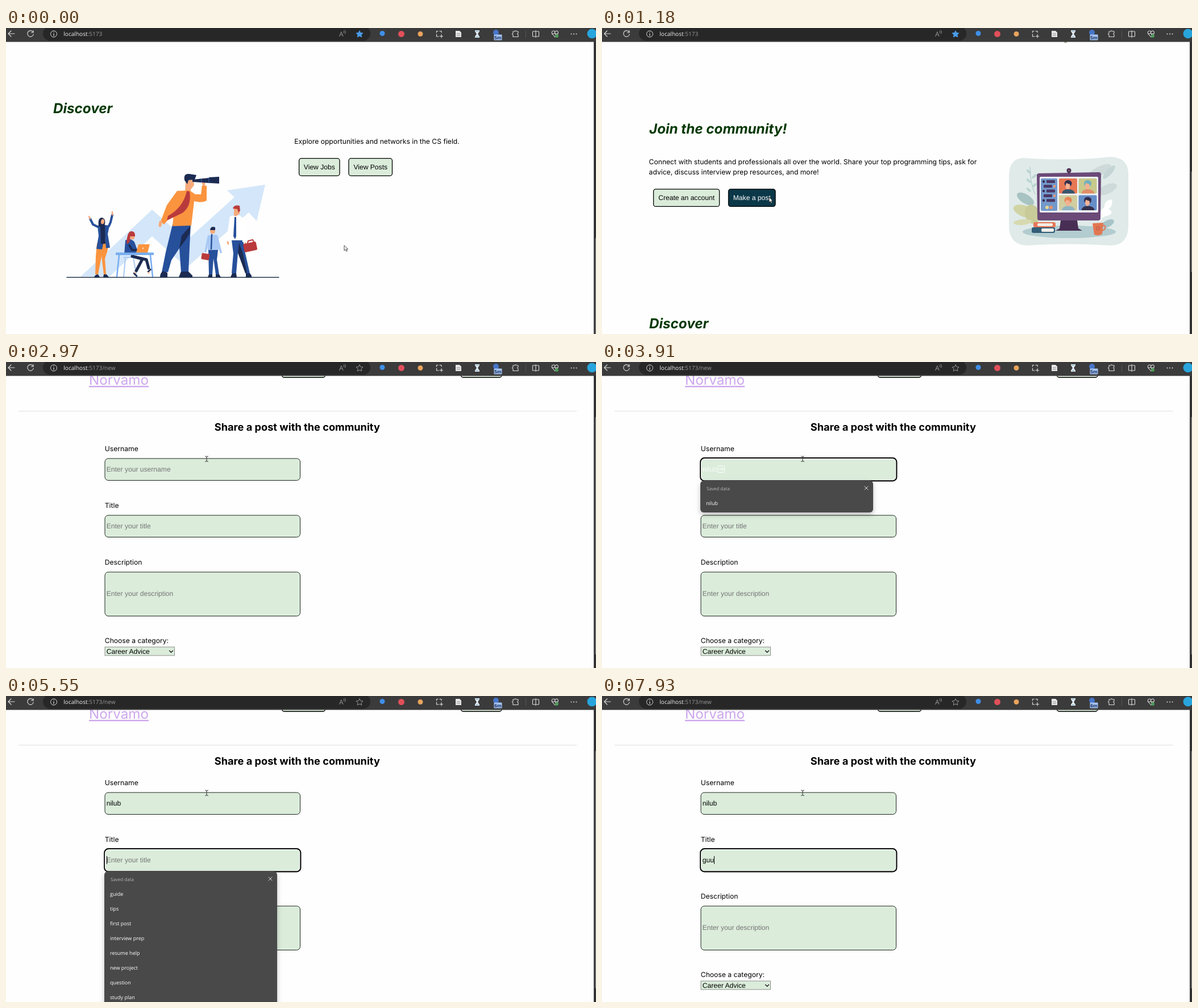
Animation of 1038 by 539 pixels, one loop 8000 ms. Source, as an HTML page:

```html
<!DOCTYPE html>
<html lang="en">
<head>
<meta charset="utf-8">
<title>Community post form</title>
<style>
  html, body { margin: 0; width: 100%; height: 100%; overflow: hidden; background: #fdfefd; }
  svg { display: block; width: 1038px; height: 539px; }
  text { white-space: pre; text-rendering: geometricPrecision; }
  .inter { font-family: Inter, sans-serif; font-size: 12.13px; }
  .arial { font-family: "Liberation Sans", Arial, sans-serif; font-size: 12.1px; }
  .ui { font-family: "Open Sans", "Noto Sans", sans-serif; font-size: 10.1px; }
  .head { font-size: 24.2px; font-weight: 700; font-style: italic; fill: #043804; }
  .mid { text-anchor: middle; }
</style>
</head>
<body>
<svg id="stage" viewBox="0 0 1038 539" xmlns="http://www.w3.org/2000/svg"></svg>
<script>
const LOOP = 8000;
const GREEN = '#dbecdb', NAVY = '#1c2b52', BLUE = '#27509b', ORANGE = '#fb943f', SKIN = '#f6aa7c', RED = '#b93a3c';
const USER = 'nilub';

const rect = (x, y, w, h, fill, rx = 0, extra = '') =>
  `<rect x="${x}" y="${y}" width="${w}" height="${h}" rx="${rx}" fill="${fill}" ${extra}/>`;
const circle = (x, y, r, fill) => `<circle cx="${x}" cy="${y}" r="${r}" fill="${fill}"/>`;
const oval = (x, y, rx, ry, fill, turn = 0) =>
  `<ellipse rx="${rx}" ry="${ry}" fill="${fill}" transform="translate(${x} ${y}) rotate(${turn})"/>`;
const shape = (d, fill) => `<path d="${d}" fill="${fill}"/>`;
const line = (d, stroke, width = 1) =>
  `<path d="${d}" fill="none" stroke="${stroke}" stroke-width="${width}" stroke-linecap="round" stroke-linejoin="round"/>`;
const text = (x, y, str, cls, extra = '') => `<text x="${x}" y="${y}" class="${cls}" ${extra}>${str}</text>`;
const button = (x, y, w, label, id = '') =>
  `<g id="${id}" fill="#000">${rect(x, y, w, 30.6, GREEN, 4, 'stroke="#000" stroke-width="1.3"')}` +
  `${text(x + w / 2, y + 19.4, label, 'arial mid')}</g>`;

function team() {
  const telescope = shape('M328 267L357 264V263L375 262V274L357 273L328 271Z', NAVY) +
    line('M344 266V272M357 264V273', '#3f69b5');
  return shape('M131 438L257 320L318 374L402 298L389 286L456 276L441 340L427 325L318 422L257 367L182 438Z', '#d4e6f9') +
    // cheering woman
    line('M161 350L153 346L148 336M181 349L184 342L187 329', BLUE, 4) +
    line('M148 336L146 332M187 329L187 324', SKIN, 2.5) +
    shape('M160 379H178L179 391L174 406L176 434H172L168 402L162 434H157L158 402Z', ORANGE) +
    shape('M161 348L166 347L174 347L182 348L179 363L183 387L176 388L174 366L169 390L159 389L163 366Z', BLUE) +
    shape('M166 347H174L175 380H167Z', NAVY) +
    shape('M163 349Q161 334 169 334Q177 336 173 349L169 352Z', NAVY) + oval(170, 341, 3, 4.5, SKIN, 10) +
    shape('M155 439Q157 434 162 434L165 439ZM171 439L172 434H177L181 439Z', NAVY) +
    // desk worker
    line('M210 404L207 439M224 404L230 439M207 404H229', '#a9c9f2', 2) +
    shape('M210 374Q219 369 226 377L231 391L228 399H208Z', BLUE) +
    line('M222 402L240 407L229 428M226 403L247 408L251 423', NAVY, 5) +
    line('M228 430L226 435M253 426L251 432', SKIN, 2) + line('M225 432L230 437M250 429L255 425', NAVY, 2.5) +
    circle(222, 368, 4.5, SKIN) + shape('M212 380Q213 359 220 358Q228 358 227 367L218 367Q220 379 212 380Z', RED) +
    line('M217 383L222 391H232', NAVY, 3.5) + shape('M233 381H253L249 396H229Z', ORANGE) + circle(241, 388, 1, '#fff') +
    rect(193, 395.5, 67, 4.5, '#78adef', 1) + line('M199 400L195 438M254 400L258 438', '#78adef', 2.5) +
    // lookout
    shape('M293 346H325L323 385L321 430H308L305 388L291 409L285 430H274L281 395Z', BLUE) +
    shape('M305 388L309 366L324 349L323 362L316 373Z', NAVY) +
    shape('M271 439Q271 432 276 428L284 431V439ZM304 439L308 429H321L328 436V439Z', NAVY) +
    shape('M316 268L330 267L331 277L326 283L323 290H315Z', SKIN) +
    shape('M301 287L323 286L333 293L343 293L345 277L353 278V304Q345 309 331 305L326 348L293 349L295 326L278 346L272 341L283 312Z', ORANGE) +
    line('M272 342L271 348M348 275L347 271', SKIN, 5) +
    shape('M318 287L323 288Q327 314 310 326L283 339L285 331Q312 316 318 287Z', RED) +
    shape('M314 268Q312 256 322 257L335 259L332 267L321 268L319 275Z', NAVY) + telescope +
    // young man
    shape('M356 391H373L371 408L375 434H369L365 406L363 434H357Z', BLUE) +
    shape('M356 365L371 364L375 391H355Z', '#a9c8f4') + line('M356 368L351 394M371 367L378 395', '#a9c8f4', 3.5) +
    line('M362 364L361 389', BLUE, 2.5) + circle(363.5, 358, 4.5, SKIN) + shape('M359 356Q360 348 368 351L368 356Z', NAVY) +
    rect(344, 397, 14, 11, RED, 2, 'transform="rotate(10 350 402)"') +
    shape('M355 439L357 434H363V439ZM369 439V434H375L378 439Z', NAVY) +
    // man with briefcase
    shape('M397 374H417L421 397L429 432H422L408 396L405 432H397L400 397Z', BLUE) +
    shape('M410 378L417 398L424 431L421 432L408 396Z', NAVY) +
    shape('M396 331L412 330L420 342L422 376L416 377L414 358L417 374H396Z', '#fff') +
    line('M396 334L391 369M416 336L421 374', '#fff', 5) + line('M390 377L391 380M421 379L422 382', SKIN, 3) +
    shape('M402 333H405L405 367L403 372L400 367Z', BLUE) + shape('M401 318H411V327L404 332L401 330Z', SKIN) +
    shape('M399 318Q401 311 411 313L412 322L409 325L407 319Z', RED) +
    rect(418, 378, 23, 15, RED, 2, 'transform="rotate(-12 430 385)"') + line('M425 379L426 375L434 373L436 377', RED, 2) +
    shape('M395 439L398 432H405L406 439ZM422 439V432H429L432 436V439Z', NAVY) +
    line('M107 439.3H480', '#26384e', 1.4);
}

function callScreen() {
  const tile = (x, y, bg, hair, shirt) => rect(x, y, 32, 26.5, bg, 2) +
    shape(`M${x + 5} ${y + 26.5}Q${x + 6} ${y + 19} ${x + 16} ${y + 19}Q${x + 27} ${y + 19} ${x + 28} ${y + 26.5}Z`, shirt) +
    oval(x + 16, y + 9, 6.5, 6, hair) + oval(x + 15.5, y + 13, 4, 6, '#f3b193') + oval(x + 17, y + 6.5, 5.5, 3, hair, 15);
  let chat = '';
  for (let i = 0; i < 5; i++) {
    const odd = i % 2, y = 268 + i * 8.3;
    chat += rect(odd ? 777 : 782, y, 15, 5, '#4b3764', 1) + circle(odd ? 796 : 777, y + 2.5, 2.2, odd ? '#ef9a72' : '#33294d');
  }
  const twig = (x, y, dx) => line(`M${x} ${y}Q${x + dx} ${y - 20} ${x + dx} ${y - 48}`, '#a8c9c6') +
    [0, 1, 2, 3, 4].map(i => oval(x + dx * .7 + (i % 2 ? 5 : -5), y - 8 - i * 8, 5, 2, '#b9d4d0', i % 2 ? -40 : 40)).join('');
  return shape('M742 229Q820 235 895 227Q927 228 926 260V350Q925 382 896 383Q820 378 748 383Q717 382 716 350V262Q716 229 742 229Z', '#dfeae9') +
    twig(762, 293, -9) + oval(874, 253, 24, 8, '#cddad9', -28) + oval(892, 254, 15, 5, '#c5d4d4', -48) +
    oval(889, 284, 18, 8, '#cddad9', -25) + oval(822, 359, 82, 11, '#b2cccf') +
    oval(745, 301, 17, 8, '#a7c3c2', 32) + oval(744, 323, 21, 10, '#d0d3a4', 20) + oval(757, 328, 13, 17, '#c8cb99', -15) +
    oval(740, 342, 16, 5, '#d7d9b0', -5) + oval(889, 345, 13, 6, '#a6c4c8', -28) +
    shape('M875 342Q873 324 884 315Q884 303 897 302Q900 313 891 319Q900 323 894 329L882 333Z', '#fff') +
    shape('M765 260Q765 256 769 256L874 254Q878 254 878 258L877 336Q877 339 873 339L770 339Q766 339 766 335Z', '#6b4a78') +
    rect(770, 262, 103, 63, '#edf2f7', 2) + rect(772, 265, 29, 57, '#7398ca', 2) + chat +
    circle(783, 316, 3, '#e5d994') + circle(790, 316, 3, '#ec9267') +
    tile(804, 265, '#e77854', '#35304c', '#35556d') + tile(838.5, 265, '#c8c98c', '#72afbd', '#df8e67') +
    tile(804, 294.5, '#d0cda0', '#e88457', '#8fb4c2') + tile(838.5, 294.5, '#668ec8', '#302d4b', '#35304c') +
    shape('M807 339H836L838 353L845 357H798L805 353Z', '#482e54') +
    circle(821.5, 251, 4, '#48304f') + line('M821.5 252V256', '#48304f', 2) + circle(821.5, 251, 1.2, '#a57796') +
    rect(759, 342, 39, 9, '#e67859', 3) + rect(766, 344, 27, 5, '#f2eee4', 2) +
    rect(756, 351, 41, 10, '#325d78', 3) + rect(773, 353, 22, 6, '#f1efe9', 2) +
    shape('M863 344L882 343L880 363Q873 367 866 364Z', '#e27752') + line('M881 348Q887 347 885 353Q884 357 880 356', '#e27752', 2) +
    `<circle cx="872.5" cy="353" r="3" fill="none" stroke="#b95343"/>`;
}

function homePage() {
  return text(83, 150, 'Discover', 'inter head') +
    text(507.3, 204, 'Explore opportunities and networks in the CS field.', 'inter') +
    button(515.6, 229.7, 71.4, 'View Jobs') + button(603, 229.7, 76.5, 'View Posts') + team() +
    `<g transform="translate(0 -379)">` +
    rect(814, 20, 1.5, 6, '#3c4630') + rect(816.5, 20, 1.5, 6, '#b5964e') +
    text(83, 186, 'Join the community!', 'inter head') +
    text(82.6, 240.2, 'Connect with students and professionals all over the world. Share your top programming tips, ask for', 'inter') +
    text(82.6, 258.4, 'advice, discuss interview prep resources, and more!', 'inter') +
    button(90.6, 283.8, 116, 'Create an account') + button(222.5, 283.8, 82.5, 'Make a post', 'makePost') + callScreen() + '</g>';
}

function field(id, y, h, label, hint) {
  return text(173.8, y - 12.7, label, 'inter') +
    rect(174, y, 343.5, h, GREEN, 6, 'stroke="#1c241c"') +
    `<g id="${id}Ring" fill="none">${rect(174.5, y + .5, 342.5, h - 1, 'none', 6, 'stroke="#fff"')}` +
    `${rect(173, y - 1, 345.5, h + 2, 'none', 7, 'stroke="#080808" stroke-width="1.8"')}</g>` +
    text(176.7, y + h / 2 + 3.6, hint, 'arial', `id="${id}Text" fill="#757575"`) +
    rect(0, y + 12, 1, 14, '#000', 0, `id="${id}Caret"`);
}

function formPage() {
  const navButton = (x, w) => rect(x, 0, w, 27.3, GREEN, 4, 'stroke="#000" stroke-width="1.4"');
  return text(146, 40, 'Norvamo', 'inter', 'style="font-size:24.2px" fill="#cda7ed" text-decoration="underline"') +
    navButton(485.5, 76) + navButton(800.5, 71.5) + rect(22, 86, 982, 1, '#dedfde') +
    text(366.8, 121, 'Share a post with the community', 'inter', 'style="font-size:18.2px;font-weight:700"') +
    field('user', 170, 38.5, 'Username', 'Enter your username') +
    field('title', 270, 38.5, 'Title', 'Enter your title') +
    field('desc', 370, 77.5, 'Description', 'Enter your description') +
    text(173.8, 495.3, 'Choose a category:', 'inter') + rect(174, 502, 122.5, 15, GREEN, 0, 'stroke="#767676" stroke-width=".8"') +
    text(176.8, 513.6, 'Career Advice', 'arial') + line('M287.5 508.5L290.5 511.5L293.5 508.5', '#111', 1.3) +
    rect(174, 554, 203, 37.5, '#ffd0d0', 5) + text(275, 578, 'Post', 'arial mid', 'style="font-size:16.1px"') +
    `<g id="ghost">${text(176.7, 192.5, `<tspan fill="#fff">${USER[0]}</tspan>${USER.slice(1)}`, 'arial', 'fill="#f4faf4"')}` +
    `${rect(203.5, 183, 12, 11.5, 'none', 2, 'stroke="#fff"')}${line('M206 188.7H213M210 186L213 188.7L210 191.5', '#fff')}</g>` +
    '<g id="menu"></g>';
}

function savedData(y, items) {
  const h = 30 + 26 * items.length;
  return rect(173, y, 304, h, '#4a4a4a', 6, 'filter="url(#shadow)"') +
    text(184, y + 16.5, 'Saved data', 'ui', 'fill="#b9b9b9" style="font-size:8px"') +
    line(`M462 ${y + 10}L468 ${y + 16}M468 ${y + 10}L462 ${y + 16}`, '#ddd') +
    items.map((s, i) => text(183, y + 42.5 + i * 26, s, 'ui', 'fill="#fff" style="font-size:9px"')).join('');
}

function toolbar() {
  const W = '#dcdcdc';
  return rect(0, 0, 1038, 24.5, '#3b3b3b') + rect(65, -3, 576, 25.5, '#272727', 12.5) +
    line('M15 10H4M9 5L4 10L9 15', W, 1.2) +
    line('M47.5 7A5.3 5.3 0 1 0 48.3 11M48 4.5V8H44.5', W, 1.2) +
    `<circle cx="84" cy="10.5" r="5.5" fill="none" stroke="${W}"/>` + line('M84 10V13.5M84 7.7V7.8', W, 1.2) +
    text(101.3, 14, '<tspan fill="#f0f0f0">localhost</tspan>:5173<tspan id="path"></tspan>', 'ui', 'fill="#9a9a9a"') +
    text(586, 14.5, 'A', 'ui', 'fill="#999" style="font-size:12px"') + line('M594 5Q596 7 594.5 9M596 4Q599 7 596.5 10', '#999', .9) +
    '<path id="star" d="M622 4.7L623.8 8.5L628 9L624.9 11.9L625.7 16L622 14L618.3 16L619.1 11.9L616 9L620.2 8.5Z" stroke-linejoin="round"/>' +
    circle(662, 9.5, 4.5, '#3f8fe8') + circle(695.5, 10.5, 5.5, '#e0505a') + circle(729, 10.5, 4.5, '#e9a45c') +
    line('M757.5 8V5.5H760M763 5.5H766V8M757.5 11V15H761M766 11.5V17M763 14.5H768.5', W, 1.2) +
    shape('M791 5H798L801 8V16H791Z', '#e8e8e8') + line('M793 10H799M793 13H799', '#777', .8) +
    shape('M825 4H833V6L830 10.5L833 15V17H825V15L828 10.5L825 6Z', '#e7eef4') + line('M826.5 6H831.5M827 15H831', '#68a2c0', 1.2) +
    circle(862, 8, 5, '#4775c8') + rect(858.5, 11.5, 14, 10, '#a6c5f6', 1) +
    text(865.5, 19.7, '5m', 'arial mid', 'id="badge" style="font-size:8.5px;font-weight:700" fill="#162b55"') +
    line('M892 6H895Q896 3.5 898 6H901V9Q898.5 10 901 12V15.5H892V12Q889 10.5 892 9Z', W, 1.1) +
    rect(914, 5, 1, 12, '#565656') + line('M931 6H927Q926.5 6 926.5 7V14Q926.5 15 927 15H931M933 6H937Q937.5 6 937.5 7V14Q937.5 15 937 15H933M932 4.5V16.5', W, 1.1) +
    line('M966 16L960.5 10Q959.5 5 963.5 5Q965 5 966 7Q967 5 969 5Q972.5 6 971 10ZM961 10H964L965.5 8L967 12L968 10H971', W, 1.1) +
    circle(969, 14, 3, '#4c9c59') + [994.5, 999, 1003.5].map(x => circle(x, 10.5, 1, W)).join('') + circle(1031, 10, 8.5, '#28a5dc');
}

const stage = document.getElementById('stage');
stage.innerHTML = `<defs><filter id="shadow" x="-10%" y="-10%" width="120%" height="150%">
  <feDropShadow dx="0" dy="4" stdDeviation="4" flood-opacity=".25"/></filter></defs>` +
  rect(0, 0, 1038, 539, '#fdfefd') + `<g id="home">${homePage()}</g><g id="form">${formPage()}</g>` +
  rect(1034, 24, 4, 515, '#333') + rect(1036, 0, 2, 1, '#666', 0, 'id="thumb"') + toolbar() +
  `<path id="arrow" d="M0 0V9L2.2 7.2L3.8 10.5L5.3 9.8L3.8 6.6H6.5Z" fill="#fff" stroke="#222" stroke-width=".8"/>` +
  `<g id="beam">${line('M-2.5 -4.5Q0 -4.5 0 -3Q0 -4.5 2.5 -4.5M0 -3V4M-2.5 5Q0 5 0 3.5Q0 5 2.5 5', '#333', 1)}</g>`;

const $ = Object.fromEntries([...stage.querySelectorAll('[id]')].map(el => [el.id, el]));
const show = (el, on) => el.setAttribute('display', on ? 'inline' : 'none');
const set = (el, attrs) => { for (const k in attrs) el.setAttribute(k, attrs[k]); };

// Each track holds [start time, value] pairs; a value holds until the next start.
const at = (track, t) => track.reduce((now, [start, value]) => t >= start ? value : now, track[0][1]);

const homeScroll = [[0, 0], [120, 54], [270, 150], [420, 255], [570, 340], [720, 379]];
const formScroll = [[0, -104], [2140, -54], [2270, -24], [2410, 0]];
const pointer = [[0, [595, 383]], [1030, [430, 335]], [1180, [294, 298]], [1600, [350, 200]], [1760, [406, 105.5]],
  [2550, [397, 117]], [2690, [380, 137]], [2830, [362, 158]], [2970, [353, 170.5]]];
const names = [USER, 'tester', 'novice', 'sample', 'reader', 'guest', 'student', 'writer'];
const topics = ['guide', 'tips', 'first post', 'interview prep', 'resume help', 'new project', 'question', 'study plan'];
const menus = [[0, ''], [3650, savedData(209, names)], [3780, savedData(209, [USER])], [4590, ''],
  [5550, savedData(309, topics)], [5840, '']];
const userTyped = [[0, ''], [4040, USER]];
const titleTyped = [[0, ''], [5840, 'g'], [5960, 'gu'], [7400, 'g'], [7530, 'gu'], [7930, 'guu']];
const focus = [[0, ''], [3520, 'user'], [5420, 'title']];
const caret = [[0, false], [3520, true], [3780, false], [4740, true], [5030, false], [5420, true], [6490, false], [7010, true]];

function fill(id, value, hint, t) {
  const focused = at(focus, t) === id, label = $[id + 'Text'];
  label.textContent = value || hint;
  label.setAttribute('fill', value ? '#000' : '#757575');
  show($[id + 'Ring'], focused);
  show($[id + 'Caret'], focused && at(caret, t));
  if (focused) $[id + 'Caret'].setAttribute('x', value ? Math.round(176.7 + label.getComputedTextLength()) : 177);
}

let openMenu = '';
function render(t) {
  const onForm = t >= 1320, hover = t >= 1180, shift = at(onForm ? formScroll : homeScroll, t);
  show($.home, !onForm);
  show($.form, onForm);
  (onForm ? $.form : $.home).setAttribute('transform', `translate(0 ${shift})`);
  set($.thumb, onForm ? { y: 97 - shift * .7, height: 418 } : { y: 370 - shift * .309, height: 177 });

  set($.makePost, { fill: hover ? '#fff' : '#000' });
  $.makePost.firstChild.setAttribute('fill', hover ? '#0b3848' : GREEN);
  $.path.textContent = onForm ? '/new' : '';
  set($.star, { fill: onForm ? 'none' : '#4a9be8', stroke: onForm ? '#999' : '#4a9be8' });
  $.badge.textContent = t < 4460 ? '5m' : '6m';

  const ghost = t >= 3780 && t < 4040;
  fill('user', at(userTyped, t), ghost ? '' : 'Enter your username', t);
  fill('title', at(titleTyped, t), 'Enter your title', t);
  fill('desc', '', 'Enter your description', t);
  show($.ghost, ghost);
  const menu = at(menus, t);
  if (menu !== openMenu) $.menu.innerHTML = openMenu = menu;

  const [x, y] = at(pointer, t), typing = t >= 1760;
  show($.arrow, !typing);
  show($.beam, typing);
  (typing ? $.beam : $.arrow).setAttribute('transform', `translate(${x} ${y})`);
}

function tick() {
  render(performance.now() % LOOP);
  requestAnimationFrame(tick);
}
tick();
</script>
</body>
</html>
```
